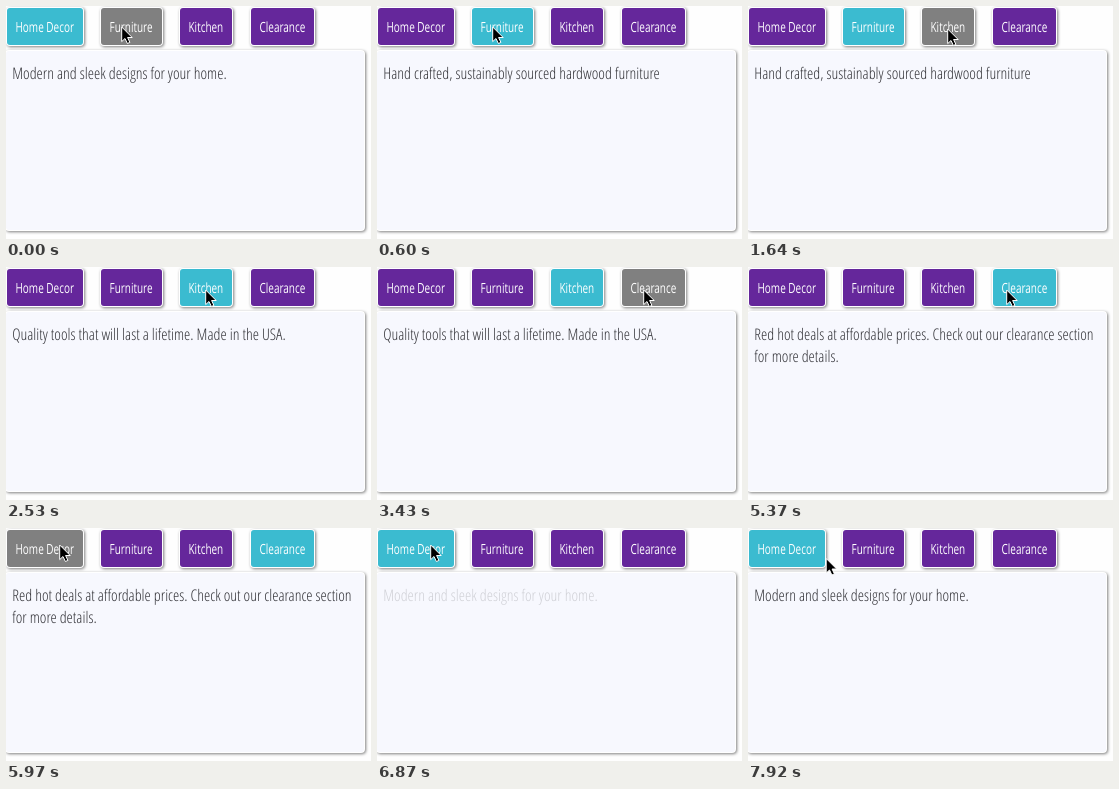
Recreate the animation shown at these times as an HTML page. Size 365 by 233 pixels, loop 8 s.

```html
<!DOCTYPE html>
<html lang="en">
<head>
<meta charset="utf-8">
<title>Tabs</title>
<style>
  html, body { margin: 0; width: 100%; height: 100%; overflow: hidden; background: #fefefe; }
  svg { display: block; }
  text { font-family: "Open Sans", "Noto Sans", sans-serif; white-space: pre; text-rendering: geometricPrecision; }
  .box { fill: #fff; filter: drop-shadow(1px 1px 1.5px rgba(0, 0, 0, .5)); }
  .label { font-size: 14px; fill: #fff; }
  .line { font-size: 16px; fill: #333338; }
</style>
</head>
<body>
<svg id="stage" width="365" height="233" viewBox="0 0 365 233"></svg>
<script>
const LOOP = 8000;
const PURPLE = "#65279b", CYAN = "#3bbbd0", GRAY = "#808080";

const tabs = [
  { label: "Home Decor", x: 1, w: 76, lines: ["Modern and sleek designs for your home."] },
  { label: "Furniture", x: 95, w: 61, lines: ["Hand crafted, sustainably sourced hardwood furniture"] },
  { label: "Kitchen", x: 174, w: 52, lines: ["Quality tools that will last a lifetime. Made in the USA."] },
  { label: "Clearance", x: 245, w: 63, lines: [
    "Red hot deals at affordable prices. Check out our clearance section",
    "for more details."] },
];

// Time and tab of each click; the new text then fades in.
const clicks = [[-2000, 0], [300, 1], [2230, 2], [4330, 3], [6870, 0]];
const fade = [[0, .2], [145, .65], [295, 1]];

// Time, x, y of the pointer.
const path = [
  [0, 115, 20],
  [1050, 122, 21], [1200, 149, 24], [1340, 179, 24], [1490, 195, 23], [1640, 199, 22],
  [2980, 207, 23], [3130, 233, 24], [3280, 258, 24], [3430, 266, 22],
  [5370, 258, 22], [5520, 206, 22], [5670, 126, 20], [5820, 71, 17], [5970, 53, 16],
  [7920, 77.5, 29.5],
];

const stage = document.getElementById("stage");

function add(tag, attrs, text = "") {
  const el = document.createElementNS("http://www.w3.org/2000/svg", tag);
  for (const key in attrs) el.setAttribute(key, attrs[key]);
  el.textContent = text;
  return stage.appendChild(el);
}

function measure(cls, text, style) {
  const el = add("text", { class: cls, style }, text);
  const width = el.getComputedTextLength();
  el.remove();
  return width;
}

// Condensed face if the font has one, narrowed further by one ratio per face.
function makeFace(cls, text, width, weight) {
  const style = `font-stretch:75%;font-weight:${weight}`;
  return { cls, style, ratio: width / measure(cls, text, style) };
}

const lineFace = makeFace("line", tabs[3].lines[0], 339.4, 300);
const labelFace = makeFace("label", tabs[0].label, 58.5, 500);

function write(face, text, x, y) {
  return add("text", {
    class: face.cls, style: face.style,
    transform: `translate(${x} ${y}) scale(${face.ratio} 1)`,
  }, text);
}

for (const tab of tabs) {
  add("rect", { class: "box", x: tab.x - 1, y: 1, width: tab.w + 2, height: 39, rx: 4 });
  tab.face = add("rect", { x: tab.x, y: 2, width: tab.w, height: 37, rx: 3 });
  write(labelFace, tab.label, tab.x + 8.5, 26);
}

add("rect", { class: "box", x: -1, y: 44, width: 360, height: 181, rx: 4 });
add("rect", { x: 0, y: 45, width: 358, height: 179, rx: 3, fill: "#f7f8fe" });
for (const tab of tabs)
  tab.texts = tab.lines.map((line, i) => write(lineFace, line, 6.2, 73 + 22 * i));

const pointer = add("path", {
  d: "M.7 1V15.6L4 12.5L6.4 17.5L8.9 16.4L6.6 11.5H11.2Z",
  fill: "#000", stroke: "#fff", "stroke-width": 1, "stroke-linejoin": "round",
});

const latest = (keys, t) => keys.filter(key => key[0] <= t).pop();

function draw(t) {
  const [, x, y] = latest(path, t);
  const [since, active] = latest(clicks, t);
  const opacity = latest(fade, t - since)[1];
  tabs.forEach((tab, i) => {
    const hover = x >= tab.x && x < tab.x + tab.w && y < 39;
    tab.face.setAttribute("fill", i === active ? CYAN : hover ? GRAY : PURPLE);
    for (const text of tab.texts) text.setAttribute("opacity", i === active ? opacity : 0);
  });
  pointer.setAttribute("transform", `translate(${x} ${y})`);
}

const start = performance.now();
function tick() {
  draw((performance.now() - start) % LOOP);
  requestAnimationFrame(tick);
}
tick();
</script>
</body>
</html>
```
